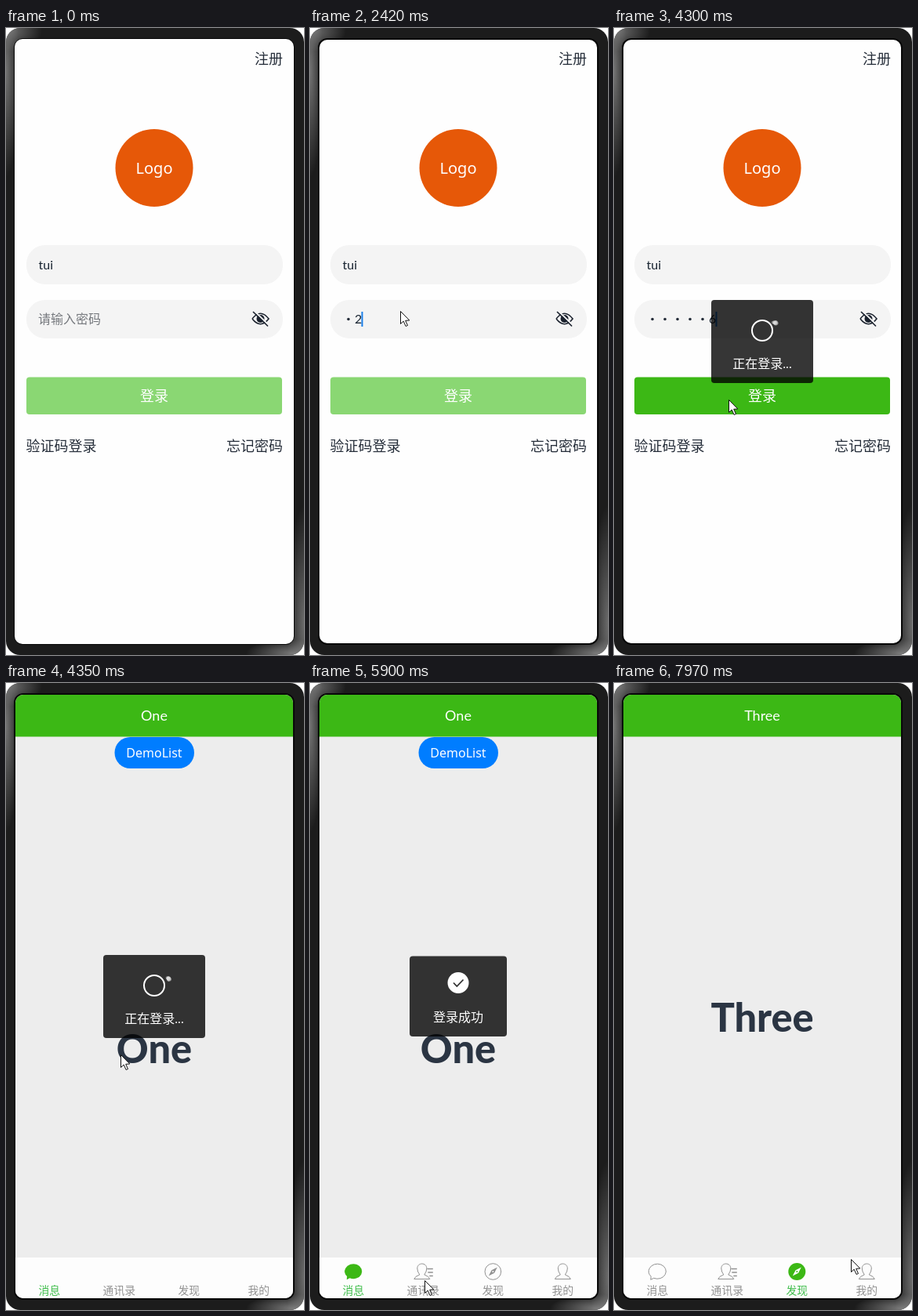
An HTML page with a canvas for the animation above (8 s loop, 380x800 px).

```html
<!DOCTYPE html>
<html lang="zh-CN">
<head>
<meta charset="utf-8">
<title>Login demo</title>
<style>
  html, body { margin: 0; width: 100%; height: 100%; overflow: hidden; background: #fff; }
  canvas { display: block; width: 380px; height: 800px; }
</style>
</head>
<body>
<canvas id="stage" width="380" height="800"></canvas>
<script>
const ctx = document.getElementById('stage').getContext('2d');
const LOOP = 8000;
const FONT = 'Lato, "Noto Sans CJK SC", "Noto Sans CJK", sans-serif';
const WIDE = '"Noto Sans", sans-serif';
const GREEN = '#3cb815', INK = '#262e3a', GRAY = '#929292';

// Event times in ms
const FOCUS = 830, BLINK = 1420, INSET = 1850;
const KEYS = [1900, 2420, 2650, 2880, 3150, 3350];
const SUBMIT = 3970, HOME = 4350, ICONS = 4450, SUCCESS = 4580, CLOSE = 5940;
const TWO = 6680, THREE = 7350, TAB_LAG = 50;

// Pointer path: time, x, y
const PATH = [
  [180, 151, 609], [790, 115, 361],
  [3350, 115, 361], [3730, 146, 474],
  [4970, 146, 474], [5330, 315, 781], [5700, 150, 762],
  [5860, 150, 762], [5900, 146, 762],
  [6679, 146, 762], [6680, 153, 764],
  [6750, 153, 764], [7020, 228, 762],
  [7370, 228, 762], [7530, 306, 753],
  [7679, 306, 753], [7680, 306, 752],
  [7969, 306, 752], [7970, 302, 735]
];

const clamp = v => Math.max(0, Math.min(1, v));
const ease = v => v * v * (3 - 2 * v);

function text(str, x, y, size, color, align = 'center', weight = 400, family = FONT) {
  ctx.font = `${weight} ${size}px ${family}`;
  ctx.textAlign = align;
  ctx.fillStyle = color;
  ctx.fillText(str, x, y);
}

function box(x0, y0, x1, y1, r, color) {
  ctx.beginPath();
  ctx.roundRect(x0, y0, x1 - x0, y1 - y0, r);
  ctx.fillStyle = color;
  ctx.fill();
}

function disc(x, y, r, color) {
  ctx.beginPath();
  ctx.arc(x, y, r, 0, Math.PI * 2);
  ctx.fillStyle = color;
  ctx.fill();
}

function line(points, color, width) {
  ctx.beginPath();
  points.forEach(([x, y]) => ctx.lineTo(x, y));
  ctx.strokeStyle = color;
  ctx.lineWidth = width;
  ctx.stroke();
}

function glow(x, y, rx, ry, color) {
  ctx.save();
  ctx.translate(x, y);
  ctx.scale(rx, ry);
  const g = ctx.createRadialGradient(0, 0, 0, 0, 0, 1);
  g.addColorStop(0, `rgba(${color},.9)`);
  g.addColorStop(1, `rgba(${color},0)`);
  ctx.fillStyle = g;
  ctx.fillRect(-1, -1, 2, 2);
  ctx.restore();
}

function phone() {
  ctx.fillStyle = '#fff';
  ctx.fillRect(0, 0, 380, 800);
  ctx.save();
  ctx.beginPath();
  ctx.roundRect(0, 0, 380, 800, 18);
  ctx.clip();
  ctx.fillStyle = '#1c1c1c';
  ctx.fillRect(0, 0, 380, 800);
  glow(0, 55, 17, 135, '125,125,125');
  glow(4, 4, 42, 26, '120,120,120');
  glow(380, 760, 22, 150, '115,115,115');
  glow(366, 798, 60, 18, '130,130,130');
  ctx.restore();
  box(10, 13, 368, 787, 12, '#080808');
}

function eye() {
  ctx.beginPath();
  ctx.moveTo(314, 371);
  ctx.quadraticCurveTo(324.5, 357.5, 335, 371);
  ctx.quadraticCurveTo(324.5, 384.5, 314, 371);
  ctx.strokeStyle = '#1b222e';
  ctx.lineWidth = 1.6;
  ctx.stroke();
  disc(324.5, 371, 5, '#1b222e');
  line([[317, 361.5], [335.5, 379.5]], '#f4f4f4', 1.8);
  line([[315, 362], [334, 380.5]], '#1b222e', 1.7);
}

// Returns true once every key has been typed
function password(t) {
  const n = KEYS.filter(k => t >= k).length;
  const left = 41, step = 16, last = left + (n - 1) * step;
  for (let i = 0; i < n - 1; i++) disc(left + 8 + i * step, 371.5, 1.8, INK);
  if (n) text(n, last, 377, 16, '#182431', 'left');
  else text('请输入密码', left, 377, 16, '#76797e', 'left');
  if (n || (t >= FOCUS && t < BLINK)) {
    ctx.fillStyle = '#1a7fe8';
    ctx.fillRect(n ? last + 8.5 : 42, 362, 2, 19);
  }
  return n === KEYS.length;
}

function login(t) {
  ctx.fillStyle = '#fefefe';
  ctx.fillRect(0, 0, 380, 800);
  text('注册', 353, 45.5, 18, INK, 'right');
  disc(189, 178.5, 49.5, '#e65808');
  text('Logo', 189, 186, 20, '#fff', 'center', 400, WIDE);
  box(26, 277, 353, 327, 24, '#f4f4f4');
  box(26, 347, 353, 396, 24, '#f4f4f4');
  text('tui', 41.5, 308, 16, '#182431', 'left');
  const ready = password(t);
  eye();
  box(26, 445.5, 352, 493, 4, ready ? GREEN : '#8ad773');
  text('登录', 189, 475.5, 18, '#fff');
  text('验证码登录', 25.5, 539.5, 18, INK, 'left');
  text('忘记密码', 353, 539.5, 18, INK, 'right');
}

// Fill when active, thin outline otherwise
function paint(on) {
  if (on) {
    ctx.fillStyle = GREEN;
    ctx.fill();
  } else {
    ctx.strokeStyle = GRAY;
    ctx.lineWidth = 1;
    ctx.stroke();
  }
}

function bubble(x, on) {
  ctx.beginPath();
  ctx.ellipse(x, 750.7, 11, 9.5, 0, 2, 2.4, true);
  ctx.lineTo(x - 8.5, 761.3);
  ctx.closePath();
  paint(on);
}

function person(x, on) {
  ctx.beginPath();
  ctx.moveTo(x - 10, 760.5);
  ctx.quadraticCurveTo(x - 9, 757, x - 3, 755);
  ctx.quadraticCurveTo(x - 6, 751, x - 6, 747);
  ctx.bezierCurveTo(x - 6, 739, x + 6, 739, x + 6, 747);
  ctx.quadraticCurveTo(x + 6, 751, x + 3, 755);
  ctx.quadraticCurveTo(x + 9, 757, x + 10, 760.5);
  ctx.closePath();
  paint(on);
}

function contacts(x, on) {
  person(x - 1.5, on);
  for (const [y, dx] of [[747.5, 5], [752, 6], [756.5, 8]])
    line([[x + dx, y], [x + 12.5, y]], on ? GREEN : GRAY, 1.3);
}

function compass(x, on) {
  ctx.beginPath();
  ctx.arc(x, 751, on ? 11 : 10.3, 0, Math.PI * 2);
  paint(on);
  ctx.beginPath();
  for (const [dx, dy] of [[5.5, -5.5], [1.8, 1.8], [-5.5, 5.5], [-1.8, -1.8]])
    ctx.lineTo(x + dx, 751 + dy);
  ctx.closePath();
  ctx.fillStyle = on ? '#fff' : GRAY;
  ctx.fill();
  disc(x, 751, 1, on ? GREEN : '#fff');
}

const TABS = [['消息', bubble], ['通讯录', contacts], ['发现', compass], ['我的', person]];

function home(t) {
  const page = t < TWO ? 0 : t < THREE ? 1 : 2;
  const active = t < TWO + TAB_LAG ? 0 : t < THREE + TAB_LAG ? 1 : 2;
  const title = ['One', 'Two', 'Three'][page];
  ctx.fillStyle = '#ededed';
  ctx.fillRect(0, 0, 380, 800);
  ctx.fillStyle = GREEN;
  ctx.fillRect(0, 0, 380, 68.5);
  text(title, 189, 48, 18, '#fff');
  if (!page) {
    box(138.5, 69, 240, 109, 20, '#007dff');
    text('DemoList', 189, 95, 16, '#fff', 'center', 500, WIDE);
  }
  text(title, 189, page ? 445 : 485, 50.5, '#2b3543', 'center', 800);
  ctx.fillStyle = '#fdfdfd';
  ctx.fillRect(0, 733, 380, 70);
  TABS.forEach(([label, icon], i) => {
    const x = 55.3 + i * 89, on = i === active;
    if (t >= ICONS) icon(x, on);
    text(label, x, 780, 13.8, on ? '#3fbd4b' : GRAY);
  });
}

function spinner(t) {
  ctx.beginPath();
  ctx.arc(189, 386, 13, 0, Math.PI * 2);
  ctx.strokeStyle = '#fff';
  ctx.lineWidth = 2;
  ctx.stroke();
  ctx.save();
  ctx.translate(189, 386);
  ctx.rotate(-0.41);
  for (let i = 6; i >= 0; i--) {
    const a = (t - HOME) / 1200 * Math.PI * 2 - i * 0.07;
    disc(20.5 * Math.cos(a), 7 * Math.sin(a), 3 - i * 0.2, `rgba(235,235,235,${0.5 - i * 0.06})`);
  }
  ctx.restore();
}

function dialog(t) {
  const alpha = clamp((t - SUBMIT + 30) / 150) * (1 - clamp((t - CLOSE) / 260));
  if (!alpha) return;
  ctx.globalAlpha = alpha;
  if (t < SUCCESS) {
    box(124, 347, 254, 453, 4, 'rgba(0,0,0,.79)');
    spinner(t);
    text('正在登录...', 189, 434, 16, '#fff');
  } else {
    box(127, 348.5, 251, 451, 4, 'rgba(0,0,0,.79)');
    disc(189, 382.5, 13.5, '#fff');
    line([[183, 382.5], [187.3, 387], [195.5, 378.5]], '#303030', 1.8);
    text('登录成功', 189, 432, 16, '#fff');
  }
  ctx.globalAlpha = 1;
}

function pointer(t) {
  if (t < PATH[0][0]) return;
  let i = PATH.length - 1;
  while (PATH[i][0] > t) i--;
  const a = PATH[i], b = PATH[i + 1] || a;
  const k = b === a ? 0 : ease((t - a[0]) / (b[0] - a[0]));
  ctx.save();
  ctx.translate(Math.round(a[1] + (b[1] - a[1]) * k) + 0.5, Math.round(a[2] + (b[2] - a[2]) * k) + 0.5);
  ctx.beginPath();
  for (const [x, y] of [[0, 0], [0, 16], [3.7, 12.6], [6.6, 19], [9, 18], [6.2, 11.8], [11.3, 11.5]])
    ctx.lineTo(x, y);
  ctx.closePath();
  ctx.fillStyle = '#fff';
  ctx.fill();
  ctx.strokeStyle = '#111';
  ctx.lineWidth = 1;
  ctx.stroke();
  ctx.restore();
}

function draw(t) {
  phone();
  const d = t < INSET ? 0 : 1;
  ctx.save();
  ctx.beginPath();
  ctx.roundRect(11 + d, 14 + d, 356 - 2 * d, 772 - 2 * d, 10);
  ctx.clip();
  (t < HOME ? login : home)(t);
  dialog(t);
  ctx.restore();
  pointer(t);
}

const start = performance.now();
function tick() {
  draw((performance.now() - start) % LOOP);
  requestAnimationFrame(tick);
}
tick();
</script>
</body>
</html>
```
